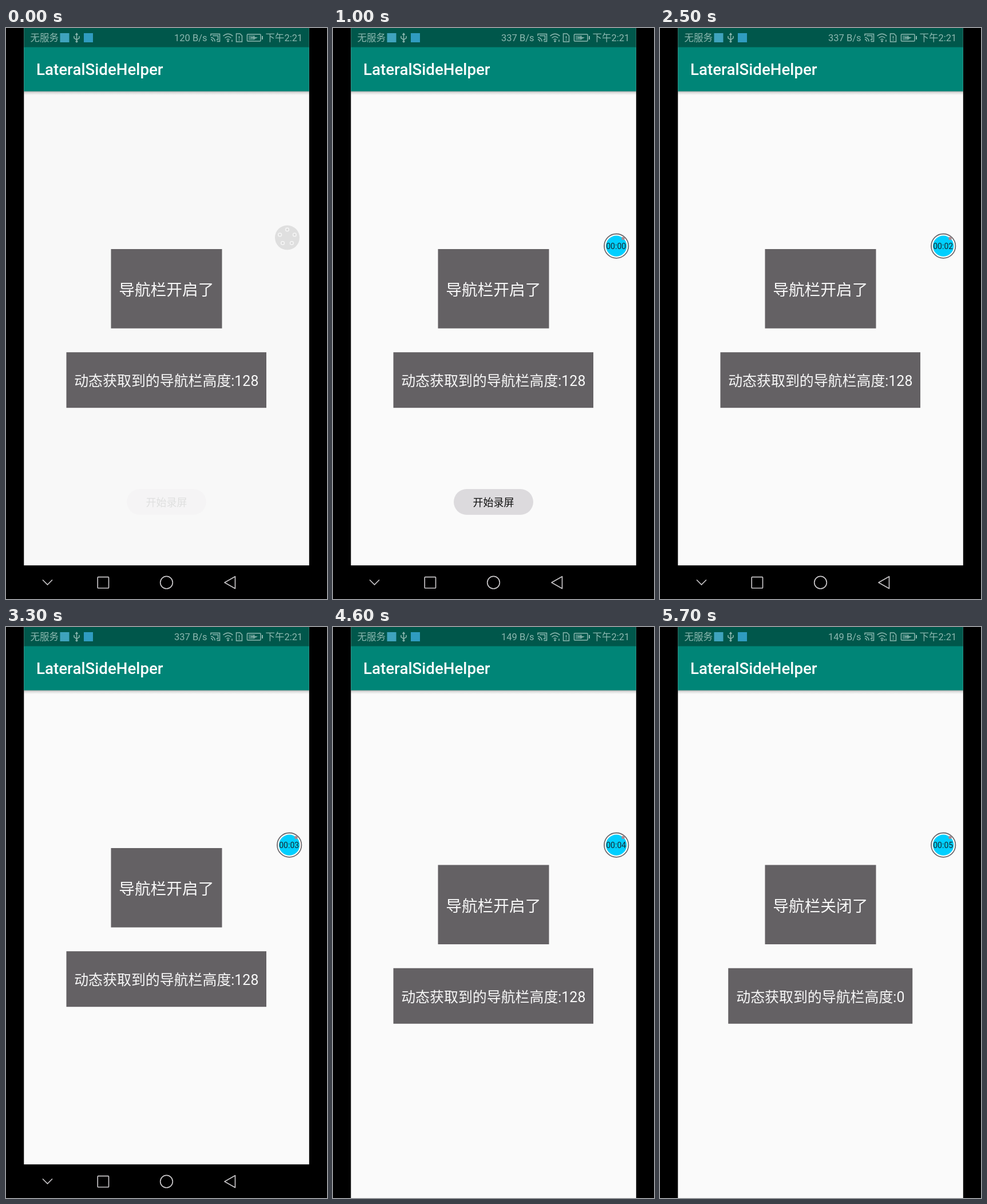
An HTML page for the animation above (6 s loop, 561 by 997 pixels).

```html
<!DOCTYPE html>
<html lang="zh-CN">
<head>
<meta charset="utf-8">
<style>
  html, body { margin: 0; width: 100%; height: 100%; overflow: hidden; background: #000; }
  svg { display: block; width: 100%; height: 100%; }
  text { font-family: Roboto, "Noto Sans CJK SC", "Noto Sans CJK", sans-serif; white-space: pre; }
  .mid { text-anchor: middle; }
  .line { fill: none; stroke: #c6c4c6; stroke-width: 1.7; }
  .status { fill: #8db8b0; font-size: 16.5px; }
  .glyph { fill: none; stroke: #8db8b0; stroke-width: 1.5; }
</style>
</head>
<body>
<svg viewBox="0 0 561 997">
  <defs>
    <linearGradient id="shade" x2="0" y2="1">
      <stop stop-color="#000" stop-opacity=".34"/>
      <stop offset=".4" stop-color="#000" stop-opacity=".12"/>
      <stop offset="1" stop-color="#000" stop-opacity="0"/>
    </linearGradient>
  </defs>
  <rect width="561" height="997"/>
  <rect id="page" x="31.300" width="498.500" height="997" fill="#fafafa"/>
  <rect x="31.300" y="110" width="498.500" height="7" fill="url(#shade)"/>
  <rect x="31.300" y="33" width="498.500" height="77.500" fill="#008577"/>
  <rect x="31.300" width="498.500" height="33.500" fill="#00574b"/>
  <text x="53" y="82" font-size="27.7" font-weight="500" fill="#fff">LateralSideHelper</text>

  <!-- status bar -->
  <g class="status">
    <text x="42.5" y="23">无服务</text>
    <text id="speed" x="351.5" y="23" text-anchor="end"></text>
    <text x="453.5" y="23">下午2:21</text>
    <rect x="94.5" y="9" width="16" height="16" fill="#3fa3bd"/>
    <rect x="136" y="9" width="16" height="16" fill="#2f9cc0"/>
  </g>
  <g class="glyph">
    <path d="M123.500 10v13M119 14v3.500l4.500 3l4.500-3v-3.500M121.500 12l2-2.500l2 2.500"/>
    <circle cx="123.500" cy="23.500" r="1.2"/>
    <path d="M358 14v-3.500h15.500v13h-5M358 16.500a7 7 0 0 1 7 7M358 20a3.500 3.500 0 0 1 3.500 3.500M361 13.500h9.500v7h-3"/>
    <path d="M379.500 14q8.500-7.500 17 0M382.500 17.500q5.500-5 11 0M385.500 20.500q2.500-2.500 5 0"/>
    <circle cx="388" cy="23" r="1"/>
    <path d="M402.500 10h6.500l3.500 3.500v10.500h-10zM407.500 14v4.500M407.500 20v1.700"/>
    <rect x="421.500" y="11" width="23.500" height="12" rx="1"/>
    <path d="M448 14v6" stroke-width="2"/>
    <path d="M424 13h11l-1 3h7l-8 5h-9z" fill="#8db8b0" stroke="none" opacity=".45"/>
    <path d="M428 17h10M433.500 14v6"/>
    <path d="M395 20.500v3.500"/>
    <path id="traffic" d="M392 21v3"/>
  </g>

  <g id="cards">
    <rect x="183.500" y="386" width="194" height="138.500" fill="#646164"/>
    <text id="state" class="mid" x="280.300" y="467" font-size="27.7" fill="#f8f8f8"></text>
    <rect id="heightBox" y="566.200" height="97" fill="#646164"/>
    <text id="height" class="mid" x="280.300" y="625" font-size="24.93" fill="#f8f8f8"></text>
  </g>

  <g id="toast">
    <rect x="211" y="805" width="139" height="45" rx="22.500" fill="#dcdadd"/>
    <text class="mid" x="280.500" y="835" font-size="18" fill="#111">开始录屏</text>
  </g>

  <g id="ball">
    <circle cx="491.500" cy="366" r="21.500" fill="#dfdfdf"/>
  </g>

  <g id="recorder">
    <circle cx="495.200" cy="380.700" r="21.200" fill="#fff" stroke="#6c696d" stroke-width="1.800"/>
    <circle cx="495.200" cy="380.700" r="18.200" fill="#00cfff"/>
    <circle cx="507" cy="367.500" r="2.800" fill="#a98b91"/>
    <text id="clock" class="mid" x="494.700" y="385.500" font-size="14" fill="#17282e"></text>
  </g>

  <g id="navBar">
    <rect x="31" y="938.300" width="499" height="59"/>
    <rect id="press" x="45" y="946" width="55.500" height="44.500" rx="22.200" fill="#353337"/>
    <g class="line">
      <path d="M64 963.500l8.500 8.500l8.500-8.500"/>
      <rect x="160.200" y="958.700" width="19.300" height="19.300" rx="1"/>
      <circle cx="280.500" cy="968.200" r="10.800"/>
      <path d="M382 968.200l18.500-10.500v21z" stroke-linejoin="round"/>
    </g>
  </g>
</svg>
<script>
const LOOP = 6000, STEP = 100;
const $ = id => document.getElementById(id);
const clamp = v => Math.max(0, Math.min(1, v));
const fade = (id, v) => $(id).setAttribute('opacity', clamp(v));
const write = (id, s) => { if ($(id).textContent !== s) $(id).textContent = s; };

// Five small shortcuts around the floating ball
for (let i = 0; i < 5; i++) {
  const a = (i / 5 - 0.25) * 2 * Math.PI;
  const dot = document.createElementNS('http://www.w3.org/2000/svg', 'circle');
  const attrs = { cx: 491.5 + 13.5 * Math.cos(a), cy: 365 + 13 * Math.sin(a), r: 2.8,
                  fill: '#d8d8d8', stroke: '#f2f2f2', 'stroke-width': 2 };
  for (const k in attrs) dot.setAttribute(k, attrs[k]);
  $('ball').append(dot);
}

function render(t) {
  const barOpen = t < 4600, detected = t < 5300;

  $('page').setAttribute('fill', t < 100 ? '#f8f8f8' : '#fafafa');
  write('speed', (t < 900 ? 120 : t < 3900 ? 337 : 149) + ' B/s');
  fade('traffic', t >= 5700 ? 1 : 0);

  fade('toast', t < 1900 ? 0.1 + 0.9 * t / 400 : 1 - (t - 1900) / 400);
  fade('ball', 1 - t / 300);
  fade('recorder', t / 300);
  // The recorder's seconds turn over 300 ms into the loop
  write('clock', '00:0' + Math.max(0, Math.floor((t - 300) / 1000)));

  fade('navBar', barOpen ? 1 : 0);
  fade('press', t >= 4500 ? 1 : 0);
  $('cards').setAttribute('transform', `translate(0 ${barOpen ? 0 : 29.5})`);

  write('state', detected ? '导航栏开启了' : '导航栏关闭了');
  write('height', '动态获取到的导航栏高度:' + (detected ? 128 : 0));
  const width = detected ? 349.5 : 322;
  $('heightBox').setAttribute('x', 280.25 - width / 2);
  $('heightBox').setAttribute('width', width);
}

const start = performance.now();
function tick() {
  const t = (performance.now() - start) % LOOP;
  render(Math.floor(t / STEP) * STEP);
  requestAnimationFrame(tick);
}
tick();
</script>
</body>
</html>
```
